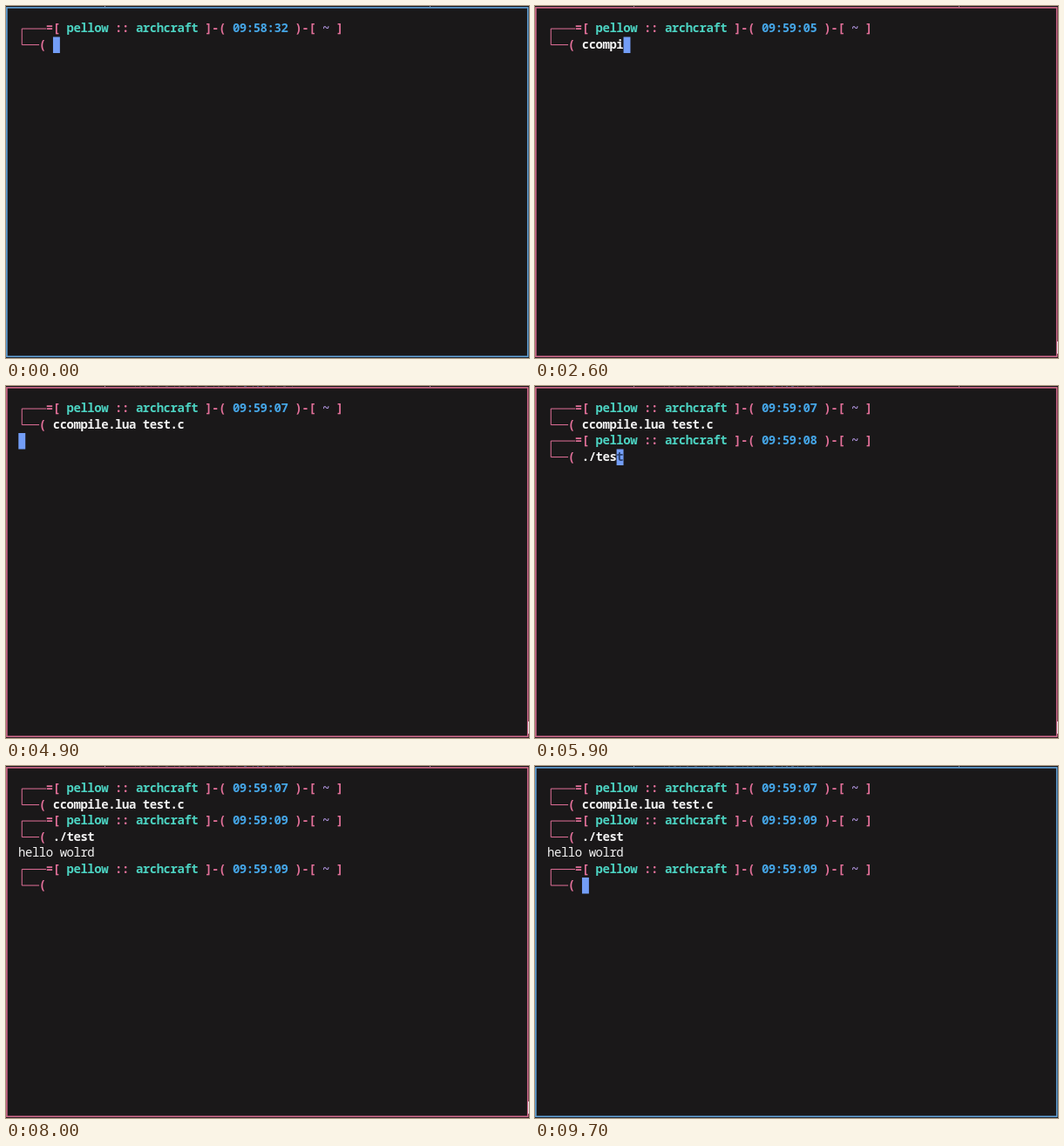
An HTML page with a canvas that plays this animation: 600 by 404 pixels, repeating every 9.8 s.

```html
<!DOCTYPE html>
<html lang="en">
<head>
<meta charset="utf-8">
<title>Terminal</title>
<style>
  html, body { margin: 0; width: 100%; height: 100%; overflow: hidden; background: #1a1819; }
  canvas { display: block; width: 600px; height: 404px; }
</style>
</head>
<body>
<canvas id="stage" width="600" height="404"></canvas>
<script>
const ctx = document.getElementById('stage').getContext('2d');
const LOOP = 9800, TICK = 100;
const LEFT = 14.3, TOP = 16.6, CELL = 7.93, ROW = 18.5, BASELINE = 13.8;
const FONT = '14px "Noto Sans Mono", "DejaVu Sans Mono", monospace';
const C = {
  bg: '#1a1819', pink: '#e3709a', teal: '#4cd3c2', blue: '#45a5e6',
  violet: '#ae93dc', white: '#f2f2f2', cursor: '#739df6', focus: '#d66c8e', idle: '#65a5dd'
};
const BLINK = 500;
const FOCUS = 700, BLUR = 8800;
const RUN_1 = 4800, PROMPT_2 = 5000, RUN_2 = 7100;
const cmd1 = { text: 'ccompile.lua test.c', start: 1770, step: 142 };
const cmd2 = { text: './test', start: 5292, step: 110 };

const colX = col => LEFT + col * CELL;
const rowY = row => TOP + row * ROW;

function rect(x, y, w, h, color) {
  ctx.fillStyle = color;
  ctx.fillRect(x, y, w, h);
}

function write(text, col, row, color, weight = 600) {
  ctx.font = weight + ' ' + FONT;
  ctx.fillStyle = color;
  [...text].forEach((ch, i) => {
    if (ch !== ' ') ctx.fillText(ch, colX(col + i + 0.5), rowY(row) + BASELINE);
  });
}

function cursor(col, row, glyph) {
  rect(colX(col), rowY(row) + 0.4, CELL, ROW, C.cursor);
  if (glyph) write(glyph, col, row, '#28406f');
}

function prompt(row, clock) {
  const x = colX(0.5), y = rowY(row) + ROW / 2 + 0.2;
  ctx.strokeStyle = C.pink;
  ctx.lineWidth = 1;
  ctx.beginPath();
  ctx.moveTo(colX(4), y);
  ctx.lineTo(x, y);
  ctx.lineTo(x, y + ROW);
  ctx.lineTo(colX(3), y + ROW);
  ctx.stroke();
  write('=[', 4, row, C.pink);
  write('pellow', 7, row, C.teal);
  write('::', 14, row, C.pink);
  write('archcraft', 17, row, C.teal);
  write(']-(', 27, row, C.pink);
  write(clock, 31, row, C.blue);
  write(')-[', 40, row, C.pink);
  write('~', 44, row, C.violet, 700);
  write(']', 46, row, C.pink);
  write('(', 3, row + 1, C.pink);
}

function clockAt(t) {
  if (t < 1800) return '09:58:32';
  return '09:59:0' + Math.min(9, 4 + Math.floor((t - 1300) / 1000));
}

function blinkOn(t, since) {
  return t < since || Math.floor((t - since) / BLINK) % 2 === 0;
}

// A fresh key sits under the block for one tick before the cursor advances.
function typeLine(cmd, row, t, end, idleFrom) {
  const { text, start, step } = cmd;
  const typed = Math.max(0, Math.min(text.length, Math.floor((t - start) / step) + 1));
  if (t >= end) return write(text, 5, row, C.white);
  const last = start + (typed - 1) * step;
  const fresh = typed > 0 && t - last < TICK;
  const shown = fresh ? typed - 1 : typed;
  write(text.slice(0, shown), 5, row, C.white);
  if (blinkOn(t, typed ? last : idleFrom)) cursor(5 + shown, row, fresh && text[shown]);
}

// Sliver of the window behind, just above the border.
function backdrop(t) {
  rect(0, 0, 600, 1, '#17171c');
  for (const x of [113, 486]) rect(x, 0, 1, 1, '#8c8c94');
  if (t < RUN_1) return;
  for (let i = 0, x = 148; x < 330; i++) {
    rect(x, 0, 1 + i % 3, 1, x > 270 && x < 302 ? '#3a4c66' : '#3c3c42');
    x += 5 + (i * 7) % 6;
  }
}

function frame(t) {
  const focused = t >= FOCUS && t < BLUR;
  rect(0, 0, 600, 404, C.bg);
  backdrop(t);
  ctx.strokeStyle = focused ? C.focus : C.idle;
  ctx.lineWidth = 1.6;
  ctx.strokeRect(0.9, 1.9, 597.8, 400.4);
  if (focused) rect(599, 385, 1, 14, '#e4dfe2');

  prompt(0, clockAt(Math.min(t, RUN_1)));
  typeLine(cmd1, 1, t, RUN_1, 1100);
  if (t < RUN_1) return;
  if (t < PROMPT_2) return cursor(0, 2);

  prompt(2, clockAt(t));
  typeLine(cmd2, 3, t, RUN_2, PROMPT_2);
  if (t < RUN_2) return;

  write('hello wolrd', 0, 4, C.white, 400);
  prompt(5, clockAt(RUN_2));
  if (!focused || blinkOn(t, RUN_2)) cursor(5, 6);
}

ctx.textAlign = 'center';
const began = performance.now();
function loop() {
  const t = (performance.now() - began) % LOOP;
  frame(Math.floor(t / TICK) * TICK);
  requestAnimationFrame(loop);
}
loop();
</script>
</body>
</html>
```
